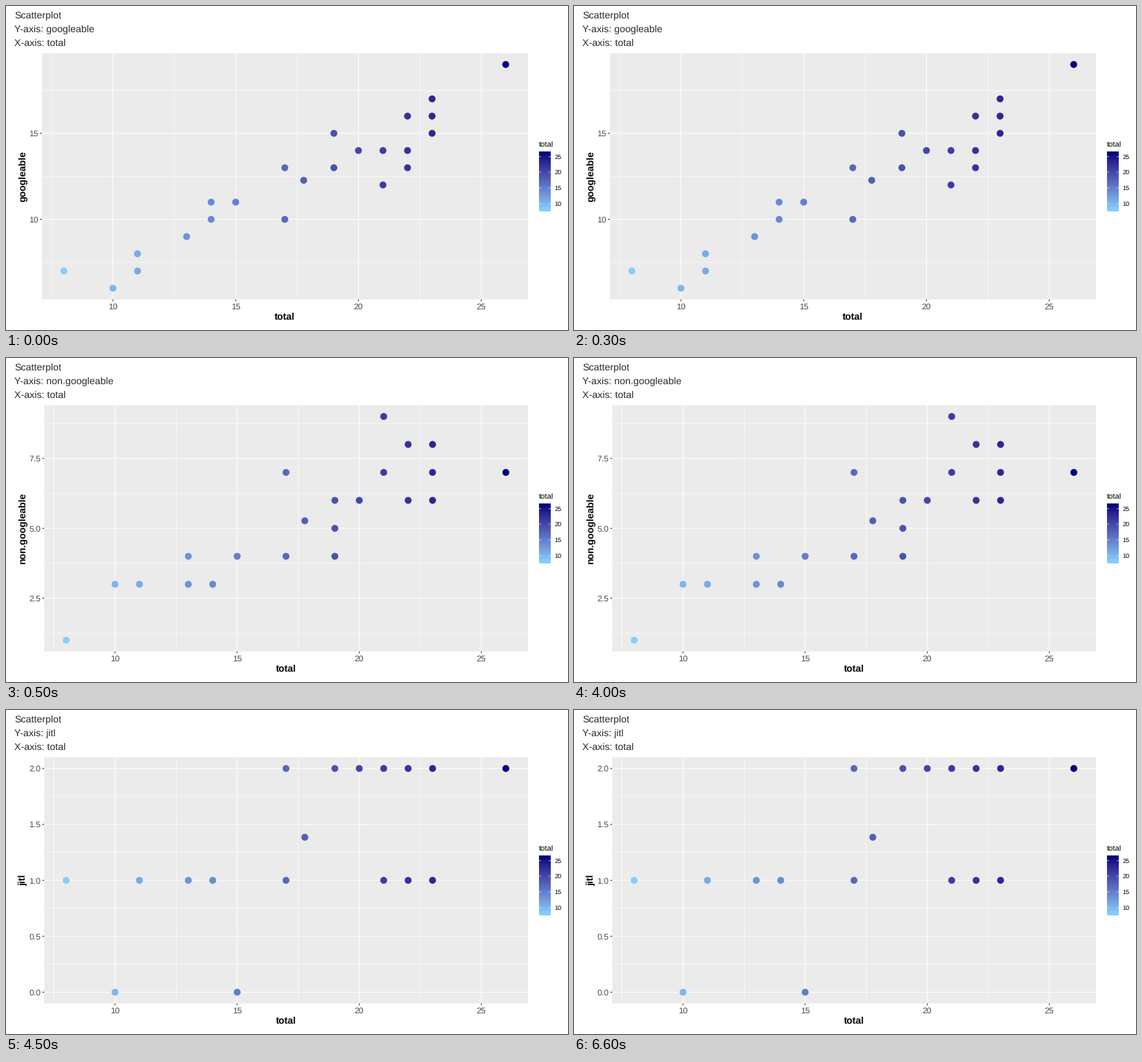
Write a matplotlib script that moves like this. It is 814 px wide and 470 px high and loops after 8 s.

```python
import numpy as np
import matplotlib.pyplot as plt
from matplotlib.animation import FuncAnimation

plt.rcParams["font.family"] = "Liberation Sans"
plt.rcParams["text.hinting"] = "none"

W, H, DPI = 814, 470, 64
PT = 72 / DPI                       # points per pixel
TOP, BOTTOM, RIGHT = 68.6, 425.6, 755.8
LOW, HIGH = 8, 26                   # range of "total"

# Googleable scores grouped by non-googleable score;
# the second group earned one bonus point in the total.
PLAIN = {1: [7], 3: [8, 11], 4: [9, 11, 13, 15], 6: [13, 14, 16, 17],
         7: [10, 14, 16, 19], 8: [14, 15], 9: [12]}
BONUS = {3: [6, 7, 9, 10], 5: [13], 8: [13]}
MEAN = (17.77, 12.27, 5.27, 1.385)


def jitl(total, easy, hard):
    if total < 17:
        return 0 if total % 5 == 0 else 1
    return 1 if easy < 2 * hard else 2


def records():
    rows = [MEAN]
    for extra, group in enumerate((PLAIN, BONUS)):
        for hard, scores in group.items():
            for easy in scores:
                total = easy + hard + extra
                rows.append((total, easy, hard, jitl(total, easy, hard)))
    return rows


# Column name, panel's left edge, y break step, label format
VIEWS = [("googleable", 51.8, 5, "{:.0f}"),
         ("non.googleable", 55.3, 2.5, "{:.1f}"),
         ("jitl", 55.3, 0.5, "{:.1f}")]

# Colour scale, interpolated in CIE Lab
M = np.array([[0.4124, 0.3576, 0.1805],
              [0.2126, 0.7152, 0.0722],
              [0.0193, 0.1192, 0.9505]])
WHITE = M.sum(axis=1)


def to_lab(rgb):
    c = np.array(rgb) / 255
    c = np.where(c > 0.04045, ((c + 0.055) / 1.055) ** 2.4, c / 12.92)
    t = M @ c / WHITE
    f = np.where(t > 0.008856, np.cbrt(t), 7.787 * t + 16 / 116)
    return np.array([116 * f[1] - 16, 500 * (f[0] - f[1]), 200 * (f[1] - f[2])])


def to_rgb(lab):
    fy = (lab[0] + 16) / 116
    f = np.array([fy + lab[1] / 500, fy, fy - lab[2] / 200])
    t = np.where(f > 0.2069, f ** 3, (f - 16 / 116) / 7.787)
    c = np.clip(np.linalg.inv(M) @ (t * WHITE), 0, 1)
    c = np.where(c > 0.0031308, 1.055 * c ** (1 / 2.4) - 0.055, 12.92 * c)
    return np.clip(c, 0, 1)


LIGHT, DARK = to_lab((135, 206, 250)), to_lab((0, 0, 128))


def shade(v):
    k = np.clip((v - LOW) / (HIGH - LOW), 0, 1)
    return to_rgb(LIGHT + (DARK - LIGHT) * k)


fig = plt.figure(figsize=(W / DPI, H / DPI), dpi=DPI, facecolor="white")
ax = fig.add_axes([0, 0, 1, 1])


def text(x, y, s, size, color="black", **kw):
    return ax.text(x, y, s, fontsize=size * PT, color=color, va="baseline", **kw)


def header(y, s):
    return text(12, y, s, 14.2, "#2b2b2b")


def line(xs, ys, color, width):
    return ax.plot(xs, ys, color=color, lw=width * PT, zorder=2,
                   solid_capstyle="butt", snap=False)[0]


def breaks(lo, hi, step):
    """Major and minor breaks inside a range widened by 5 % on both sides."""
    pad = (hi - lo) * 0.05
    halves = [n * step / 2 for n in range(-1, 60)
              if lo - pad <= n * step / 2 <= hi + pad]
    major = [v for v in halves if v % step == 0]
    return major, [v for v in halves if v % step]


def draw_legend():
    top, bottom, x0, x1 = 211.5, 298, 772, 789
    unit = (bottom - top) * 0.95 / (HIGH - LOW)
    first = top + (bottom - top) / 40

    rows = np.linspace(top, bottom, 174)
    bar = np.array([[shade(HIGH - (y - first) / unit)] for y in rows])
    ax.imshow(bar, extent=(x0, x1, bottom, top), aspect="auto",
              interpolation="bilinear")
    text(x0 - 0.2, 205.3, "total", 11.2)
    for v in range(10, 26, 5):
        y = first + (HIGH - v) * unit
        line([x0, x0 + 3.4], [y, y], "white", 0.6)
        line([x1 - 3.4, x1], [y, y], "white", 0.6)
        text(794.5, y + 3.3, str(v), 9.3)


def draw_view(column, name, left, step, fmt):
    dots = {(row[0], row[column]) for row in ROWS}
    lo = min(y for _, y in dots)
    hi = max(y for _, y in dots)
    ux = (RIGHT - left) / (1.1 * (HIGH - LOW))
    uy = (BOTTOM - TOP) / (1.1 * (hi - lo))
    mid_x, mid_y = (left + RIGHT) / 2, (TOP + BOTTOM) / 2

    def px(v):
        return mid_x + (v - (LOW + HIGH) / 2) * ux

    def py(v):
        return mid_y - (v - (lo + hi) / 2) * uy

    x_major, x_minor = breaks(LOW, HIGH, 5)
    y_major, y_minor = breaks(lo, hi, step)

    parts = [ax.add_patch(plt.Rectangle(
        (left, TOP), RIGHT - left, BOTTOM - TOP,
        fc="#ebebeb", ec="none", zorder=1, snap=False))]

    for breaks_x, breaks_y, width in ((x_minor, y_minor, 0.65),
                                      (x_major, y_major, 1.1)):
        parts += [line([px(x)] * 2, [TOP, BOTTOM], "white", width)
                  for x in breaks_x]
        parts += [line([left, RIGHT], [py(y)] * 2, "white", width)
                  for y in breaks_y]
    for x in x_major:
        parts += [
            line([px(x)] * 2, [BOTTOM, BOTTOM + 2.75], "#333333", 1.1),
            text(px(x), 439.7, f"{x:.0f}", 12.3, "#4d4d4d", ha="center"),
        ]
    for y in y_major:
        parts += [
            line([left - 2.75, left], [py(y)] * 2, "#333333", 1.1),
            text(left - 4.9, py(y) + 4.3, fmt.format(y), 12.3, "#4d4d4d",
                 ha="right"),
        ]

    parts += [ax.add_patch(plt.Circle((px(x), py(y)), 5, fc=shade(x),
                                      ec="none", zorder=3))
              for x, y in sorted(dots)]
    parts += [
        text(mid_x, 455, "total", 14, weight="bold", ha="center"),
        text(28.4, mid_y, name, 14, weight="bold", rotation=90,
             rotation_mode="anchor", ha="center"),
        header(38, "Y-axis: " + name),
    ]
    return parts


ROWS = records()
draw_legend()
header(18, "Scatterplot")
header(58, "X-axis: total")
groups = [draw_view(i, *view) for i, view in enumerate(VIEWS, 1)]
ax.set(xlim=(0, W), ylim=(H, 0))
ax.axis("off")

STEP, LOOP, FIRST, HOLD = 500, 8000, 500, 4000


def update(i):
    current = (i * STEP + HOLD - FIRST) // HOLD
    for k, parts in enumerate(groups):
        for p in parts:
            p.set_visible(k == current)
    return []


anim = FuncAnimation(fig, update, frames=LOOP // STEP, interval=STEP,
                     init_func=lambda: update(0), repeat=True, repeat_delay=0)
plt.show()
```
